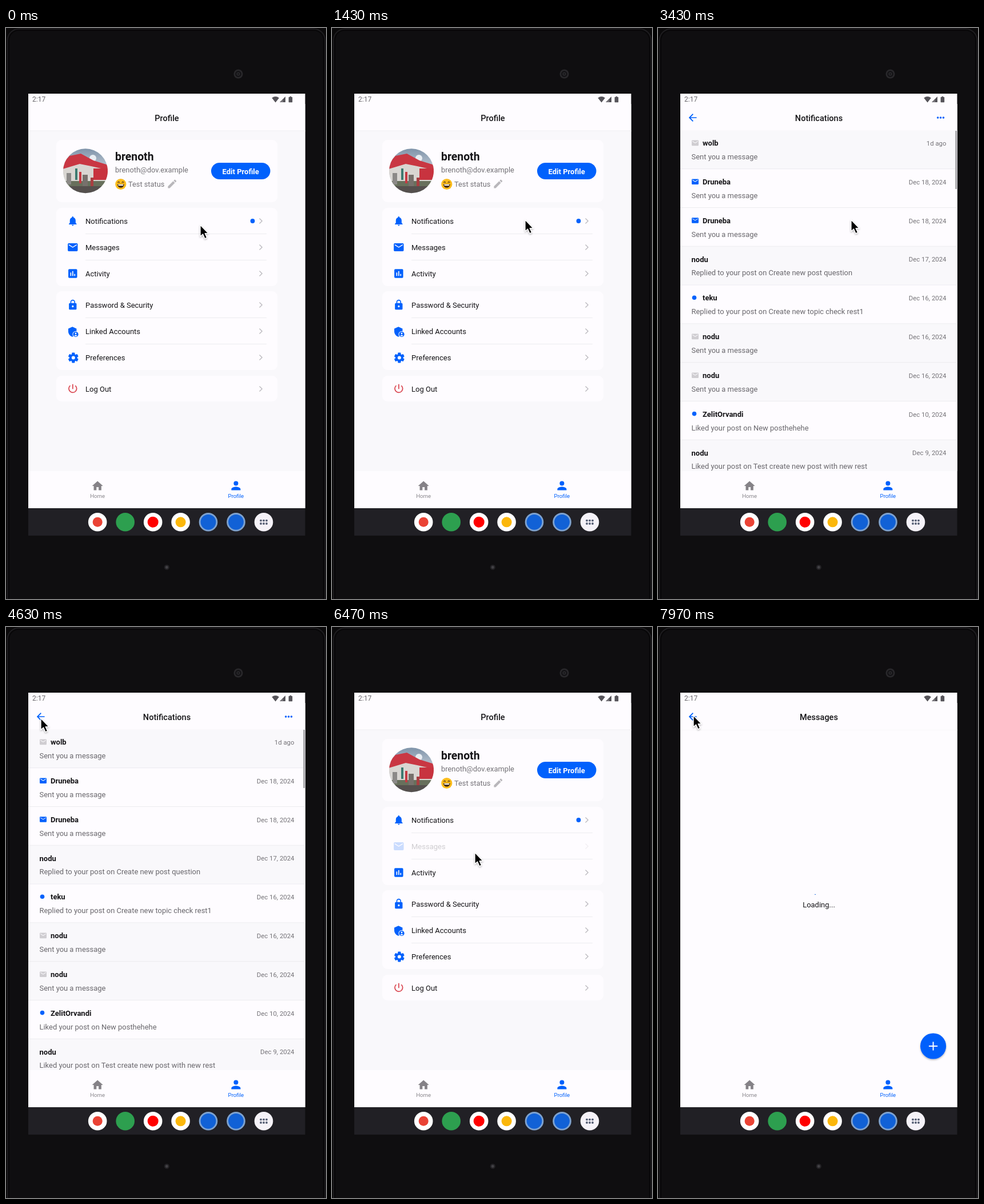
Animation of 560x1000 px, one loop 8 s. Source, as an HTML page:

```html
<!DOCTYPE html>
<html lang="en">
<head>
<meta charset="utf-8">
<title>Profile screens</title>
<style>
  html, body { margin: 0; width: 100%; height: 100%; overflow: hidden; background: #0e0d0f; }
  svg { display: block; width: 560px; height: 1000px; font-family: Roboto, sans-serif; }
</style>
</head>
<body>
<svg id="stage" viewBox="0 0 560 1000"></svg>
<script>
const LOOP = 8000;
const BLUE = '#0061fc', WHITE = '#fefcff', PALE = '#f9f8fb', LINE = '#ececef', INK = '#151417', GREY = '#747277';

const ICONS = {
  bell: 'M12 22c1.1 0 2-.9 2-2h-4c0 1.1.9 2 2 2zm6-6v-5c0-3.07-1.64-5.64-4.5-6.32V4a1.5 1.5 0 0 0-3 0v.68C7.63 5.36 6 7.92 6 11v5l-2 2v1h16v-1z',
  mail: 'M20 4H4a2 2 0 0 0-2 2v12a2 2 0 0 0 2 2h16a2 2 0 0 0 2-2V6a2 2 0 0 0-2-2zm0 4-8 5-8-5V6l8 5 8-5z',
  chart: 'M19 3H5a2 2 0 0 0-2 2v14a2 2 0 0 0 2 2h14a2 2 0 0 0 2-2V5a2 2 0 0 0-2-2zM9 17H7v-7h2zm4 0h-2V7h2zm4 0h-2v-4h2z',
  lock: 'M18 8h-1V6A5 5 0 0 0 7 6v2H6a2 2 0 0 0-2 2v10a2 2 0 0 0 2 2h12a2 2 0 0 0 2-2V10a2 2 0 0 0-2-2zm-6 9a2 2 0 1 1 0-4 2 2 0 0 1 0 4zm3.1-9H8.9V6a3.1 3.1 0 0 1 6.2 0z',
  shield: 'M11 1 2 5v6c0 5.5 3.8 10.7 9 12 5.2-1.3 9-6.5 9-12V5z',
  power: 'M13 3h-2v10h2zm4.83 2.17-1.42 1.42A7 7 0 1 1 7.58 6.58L6.17 5.17a9 9 0 1 0 11.66 0z',
  person: 'M12 12a4 4 0 1 0 0-8 4 4 0 0 0 0 8zm0 2c-2.67 0-8 1.34-8 4v2h16v-2c0-2.66-5.33-4-8-4z',
  home: 'M10 20v-6h4v6h5v-8h3L12 3 2 12h3v8z',
  pencil: 'M3 17.25V21h3.75L17.8 9.94l-3.75-3.75zM20.7 7.04a1 1 0 0 0 0-1.41l-2.34-2.34a1 1 0 0 0-1.41 0l-1.83 1.83 3.75 3.75z',
  back: 'M20 11H7.83l5.59-5.59L12 4l-8 8 8 8 1.41-1.41L7.83 13H20z'
};

const rect = (x, y, w, h, fill, rx = 0) =>
  `<rect x="${x}" y="${y}" width="${w}" height="${h}" rx="${rx}" fill="${fill}"/>`;
const disc = (x, y, r, fill) => `<circle cx="${x}" cy="${y}" r="${r}" fill="${fill}"/>`;
const text = (s, x, y, size, fill = INK, weight = 400, anchor = 'start') =>
  `<text x="${x}" y="${y}" font-size="${size}" fill="${fill}" font-weight="${weight}" text-anchor="${anchor}">${s}</text>`;
const icon = (name, x, y, scale, fill = BLUE) =>
  `<path d="${ICONS[name]}" fill="${fill}" transform="translate(${x} ${y}) scale(${scale}) translate(-12 -12)"/>`;

function gear(x, y) {
  const teeth = [0, 60, 120].map(a =>
    `<rect x="-2.6" y="-9" width="5.2" height="18" rx="1" transform="rotate(${a})"/>`).join('');
  return `<g transform="translate(${x} ${y})" fill="${BLUE}">${teeth}${disc(0, 0, 6.8, BLUE)}${disc(0, 0, 3, WHITE)}</g>`;
}

const badgeShield = (x, y) => icon('shield', x, y, .8) + disc(x + 5, y + 4.5, 5.6, WHITE) +
  disc(x + 5, y + 4.5, 4.6, BLUE) + disc(x + 5, y + 3, 1.4, WHITE) +
  `<path d="M${x + 2.3} ${y + 7}q2.7-3 5.4 0q-2.7 2-5.4 0z" fill="${WHITE}"/>`;

function row(id, label, y, mark) {
  return `<g id="${id}">${mark}${text(label, 139, y + 5, 13)}
    <path d="M443.5 ${y - 4.6}l4.6 4.6-4.6 4.6" fill="none" stroke="#bdbbc0" stroke-width="1.4"/></g>`;
}
const rule = y => rect(139, y, 317, 1, LINE);

function avatar() {
  return `<g clip-path="url(#round)">
    ${rect(99, 210, 80, 80, 'url(#sky)')}
    ${disc(152, 228, 6, '#e8edf2')}
    <path d="M99 240l28-13 52 15v34H99z" fill="#d9d6d2"/>
    <path d="M99 238l12-14 20-4 22 12 26 8v9l-30-7-20-4-30 9z" fill="#c93743"/>
    ${rect(153, 246, 26, 20, '#c8333f')}
    ${rect(99, 268, 80, 9, '#68705c')}
    ${[[106, 254, 8, '#8c8a88'], [121, 246, 4, '#3c7a70'], [128, 252, 4, '#c63a43'], [134, 257, 9, '#77716c'], [148, 262, 5, '#a83f42']]
      .map(([x, y, w, c]) => rect(x, y, w, 20, c)).join('')}
    ${rect(99, 277, 80, 14, '#55504e')}</g>`;
}

function emoji(x, y) {
  return disc(x, y, 9.6, '#fcbc1c') + `<g transform="translate(${x} ${y})">
    <path d="M-6 0H6A6 6.3 0 0 1-6 0z" fill="#493018"/><path d="M-4.6 .6h9.2l-.6 1.8h-8z" fill="#fff"/>
    <path d="M-5.4-2.6q1.7-3 3.4 0m4 0q1.7-3 3.4 0" fill="none" stroke="#493018" stroke-width="1.4"/></g>`;
}

const heading = s => text(s, 281.5, 163, 14.5, INK, 500, 'middle');
const backing = (header, body) => rect(-30, 133, 630, 48, header) + rect(-30, 180, 630, 600, body);
const backArrow = id => `<g id="${id}">${icon('back', 60.7, 157, .86)}</g>`;
const loader = id => `<circle id="${id}" cx="281.5" cy="469" r="6.4" fill="none" stroke="#1263d8" stroke-width="1.6" pathLength="100"/>` +
  text('Loading...', 281.5, 491, 13, INK, 400, 'middle');

function profilePage() {
  return backing(WHITE, PALE) + rect(-30, 179.5, 630, 1, '#f0eff2') + heading('Profile') +
    rect(88, 196, 387, 109, WHITE, 9) + avatar() +
    text('brenoth', 191, 232, 19.4, INK, 700) +
    text('brenoth@dov.example', 191, 253, 12.9, GREY) +
    emoji(200.8, 273.5) + text('Test status', 214, 278, 12.8, GREY) +
    icon('pencil', 290.8, 273, .82, '#b9b7bb') +
    rect(359, 236, 103.5, 29, BLUE, 14.5) + text('Edit Profile', 410.7, 255.6, 13, '#fff', 700, 'middle') +
    rect(88, 315, 387, 137, WHITE, 9) + rect(88, 461, 387, 138, WHITE, 9) + rect(88, 609, 387, 45, WHITE, 9) +
    [360, 406, 507, 553].map(rule).join('') +
    row('rowA', 'Notifications', 338, icon('bell', 116.8, 338, .84) + disc(431.5, 338, 3.9, BLUE)) +
    row('rowB', 'Messages', 384, icon('mail', 116.8, 384, .87)) +
    row('rowC', 'Activity', 430, icon('chart', 116.8, 430, .86)) +
    row('rowD', 'Password &amp; Security', 485, icon('lock', 116.8, 485, .83)) +
    row('rowE', 'Linked Accounts', 531, badgeShield(117, 532)) +
    row('rowF', 'Preferences', 577, gear(117.8, 577.5)) +
    row('rowG', 'Log Out', 632, icon('power', 116.8, 631.5, .86, '#d9444f'));
}

const SENT = 'Sent you a message', REPLY = 'Replied to your post on ', LIKED = 'Liked your post on ';
// name, date, message, mark, unread
const NOTES = [
  ['wolb', '1d ago', SENT, 'mail', 0],
  ['Druneba', 'Dec 18, 2024', SENT, 'mail', 1],
  ['Druneba', 'Dec 18, 2024', SENT, 'mail', 1],
  ['nodu', 'Dec 17, 2024', REPLY + 'Create new post question', '', 0],
  ['teku', 'Dec 16, 2024', REPLY + 'Create new topic check rest1', 'dot', 1],
  ['nodu', 'Dec 16, 2024', SENT, 'mail', 0],
  ['nodu', 'Dec 16, 2024', SENT, 'mail', 0],
  ['ZelitOrvandi', 'Dec 10, 2024', LIKED + 'New posthehehe', 'dot', 1],
  ['nodu', 'Dec 9, 2024', LIKED + 'Test create new post with new rest', '', 0]
];

function note([name, date, message, mark, unread], i) {
  const y = 179.4 + i * 67.8;
  const sign = mark === 'mail' ? icon('mail', 65, y + 22, .6, unread ? BLUE : '#cfcdd1')
    : mark === 'dot' ? disc(63.5, y + 25.6 - 4, 3.8, BLUE) : '';
  return rect(-30, y, 630, 67.8, unread ? WHITE : PALE) + rect(-30, y + 66.8, 630, 1, LINE) + sign +
    text(name, mark ? 78 : 58.5, y + 26.8, 13, INK, 700) +
    text(date, 504.5, y + 26.5, 11.4, GREY, 400, 'end') +
    text(message, 58.5, y + 50.5, 12.95, '#69676c');
}

function notesPage() {
  return backing(WHITE, '#eeecef') + `<g id="wait">${loader('spinA')}</g><g id="list">` +
    NOTES.map(note).join('') + rect(520.3, 180, 2.7, 102, '#a3a2a5') +
    [489.7, 494.6, 499.5].map(x => disc(x, 157, 1.8, BLUE)).join('') + '</g>' +
    heading('Notifications') + backArrow('backA');
}

function messagesPage() {
  return backing(WHITE, WHITE) + rect(-30, 180, 630, 1, '#f8f7f9') + heading('Messages') + backArrow('backB') + loader('spinB') +
    `<g filter="url(#lift)">${disc(481.6, 734, 22.6, BLUE)}</g>` +
    `<path d="M474 734h15.2m-7.6-7.6v15.2" stroke="#fff" stroke-width="2"/>`;
}

function device() {
  return rect(0, 0, 560, 1000, '#0a090a') +
    '<rect x="2.5" y="1.5" width="556" height="1016" rx="20" fill="#0f0e10" stroke="#222124" stroke-width="1.4"/>' +
    '<rect x="5" y="4" width="551" height="1016" rx="18" fill="none" stroke="#070607" stroke-width="1.5"/>' +
    disc(406.5, 80.5, 8, '#29282b') + disc(406.5, 80.5, 5.4, '#141316') + disc(406.5, 80.5, 3, '#2b2a2e') + disc(406.5, 80.5, 1.3, '#111') +
    disc(281.3, 944.5, 4.6, '#232225') + disc(281.3, 944.5, 2.4, '#424145');
}

function chrome() {
  const dock = [160.2, 208.7, 257.2, 305.6, 354, 402.5, 451];
  const tile = x => disc(x, 865.3, 16.3, '#fff');
  const dots = [-5, 0, 5].map(dx => [-2.7, 2.7].map(dy => disc(dock[6] + dx, 865.3 + dy, 1.9, '#535c72')).join('')).join('');
  return text('2:17', 46, 129.3, 12, '#68666b') +
    '<path d="M471.6 130.5l-6.3-8q6.3-4.8 12.6 0zM489 120v10h-10zM495.2 121h1.3v-1.3h2.8v1.3h1.3q.6 0 .6.6v8q0 .6-.6.6h-5.4q-.6 0-.6-.6v-8q0-.6.6-.6z" fill="#56545a"/>' +
    '<path d="M484.5 126v3.6h-4z" fill="#88868b"/>' +
    rect(39, 776, 484.5, 65, WHITE) +
    icon('home', 160.2, 802, .95, '#858287') + text('Home', 160.2, 823.3, 9.7, '#89878c', 400, 'middle') +
    icon('person', 402.4, 801.5, 1) + text('Profile', 402.4, 823.3, 9.7, BLUE, 400, 'middle') +
    rect(39, 841, 484.5, 48, '#212025') +
    tile(dock[0]) + disc(dock[0], 865.3, 8.5, '#ea4335') +
    disc(dock[1], 865.3, 16.3, '#2d9f4f') +
    tile(dock[2]) + disc(dock[2], 865.3, 9.5, '#ff0000') +
    tile(dock[3]) + disc(dock[3], 865.3, 9, '#fbb70b') +
    [dock[4], dock[5]].map(x => disc(x, 865.3, 16.3, '#7ea2cf') + disc(x, 865.3, 13.4, '#1161d6')).join('') +
    disc(dock[6], 865.3, 16.3, '#f5f2f8') + dots;
}

const stage = document.getElementById('stage');
stage.innerHTML = `<defs>
  <clipPath id="pane"><rect x="39" y="133" width="484.5" height="643"/></clipPath>
  <clipPath id="round"><circle cx="139" cy="250.3" r="39"/></clipPath>
  <linearGradient id="sky" x1="0" y1="0" x2="0" y2="1"><stop offset="0" stop-color="#7d92a8"/><stop offset=".5" stop-color="#c4ced8"/></linearGradient>
  <filter id="lift" x="-30%" y="-30%" width="160%" height="160%"><feDropShadow dx="0" dy="1.6" stdDeviation="1.6" flood-opacity=".3"/></filter>
  </defs>
  ${device()}${rect(39, 115, 484.5, 726, WHITE)}
  <g clip-path="url(#pane)"><g id="profile">${profilePage()}</g><g id="notes">${notesPage()}</g><g id="messages">${messagesPage()}</g></g>
  ${chrome()}
  <g id="cursor" filter="url(#lift)"><path d="M0 0V20L4.5 16 8 23.8 11.6 22.2 8.2 14.7H14.2Z" fill="#000" stroke="#fff" stroke-width="1.3" stroke-linejoin="round"/></g>`;

const el = id => document.getElementById(id);
const parts = Object.fromEntries(['profile', 'notes', 'messages', 'wait', 'list', 'spinA', 'spinB', 'rowA', 'rowB', 'backA', 'cursor']
  .map(id => [id, el(id)]));

const clamp = v => Math.max(0, Math.min(1, v));
const ramp = (t, start, span) => clamp((t - start) / span);
const smooth = k => k * k * (3 - 2 * k);
const settle = k => 1 - (1 - k) ** 4;

// time, x, y
const PATH = [[0, 340, 345], [300, 340, 345], [1100, 338, 336], [3450, 338, 336], [4250, 61, 160],
  [5000, 61, 160], [5630, 187, 289], [6230, 250, 395], [6850, 250, 395], [7480, 58, 152], [7970, 62, 155]];

function cursorAt(t) {
  const i = PATH.findIndex(p => p[0] > t);
  if (i < 0) return PATH[PATH.length - 1].slice(1);
  const [t0, x0, y0] = PATH[i - 1], [t1, x1, y1] = PATH[i];
  const k = smooth(ramp(t, t0, t1 - t0));
  return [x0 + (x1 - x0) * k, y0 + (y1 - y0) * k];
}

const pressed = (t, down, up) => 1 - .8 * smooth(ramp(t, down, 130)) * (1 - smooth(ramp(t, up, 250)));

function spin(node, age, turn) {
  const u = (Math.max(0, age) % 1333) / 1333;
  const head = 75 * settle(clamp(u * 2)), tail = 75 * smooth(clamp(u * 2 - 1));
  const angle = -90 + turn + age * 720 / 4444 + 90 * u + tail * 3.6;
  const len = Math.max(3, head - tail);
  node.setAttribute('stroke-dasharray', `${len} ${100 - len}`);
  node.setAttribute('transform', `rotate(${angle} 281.5 469)`);
}

function page(node, depth, alpha) {
  node.setAttribute('transform', `translate(${48 * (1 - depth)} 0)`);
  node.setAttribute('opacity', alpha);
}

function draw(t) {
  const notesDepth = settle(ramp(t, 1650, 450)) - settle(ramp(t, 4800, 450));
  const notesAlpha = ramp(t, 1700, 83) - ramp(t, 4835, 83);
  const msgDepth = settle(ramp(t, 6560, 450));
  page(parts.notes, notesDepth, notesAlpha);
  page(parts.messages, msgDepth, ramp(t, 6610, 83));
  parts.profile.setAttribute('transform', `translate(${-48 * Math.max(notesDepth, msgDepth)} 0)`);

  const loaded = t >= 3200;
  parts.wait.setAttribute('visibility', loaded ? 'hidden' : 'visible');
  parts.list.setAttribute('visibility', loaded ? 'visible' : 'hidden');
  spin(parts.spinA, t - 1800, 0);
  spin(parts.spinB, t - 6650, 57);

  parts.rowA.setAttribute('opacity', pressed(t, 1500, 1640));
  parts.rowB.setAttribute('opacity', pressed(t, 6320, 6480));
  parts.backA.setAttribute('opacity', pressed(t, 4670, 4800));
  parts.cursor.setAttribute('transform', `translate(${cursorAt(t).join(' ')})`);
}

function tick() {
  draw(performance.now() % LOOP);
  requestAnimationFrame(tick);
}
tick();
</script>
</body>
</html>
```
